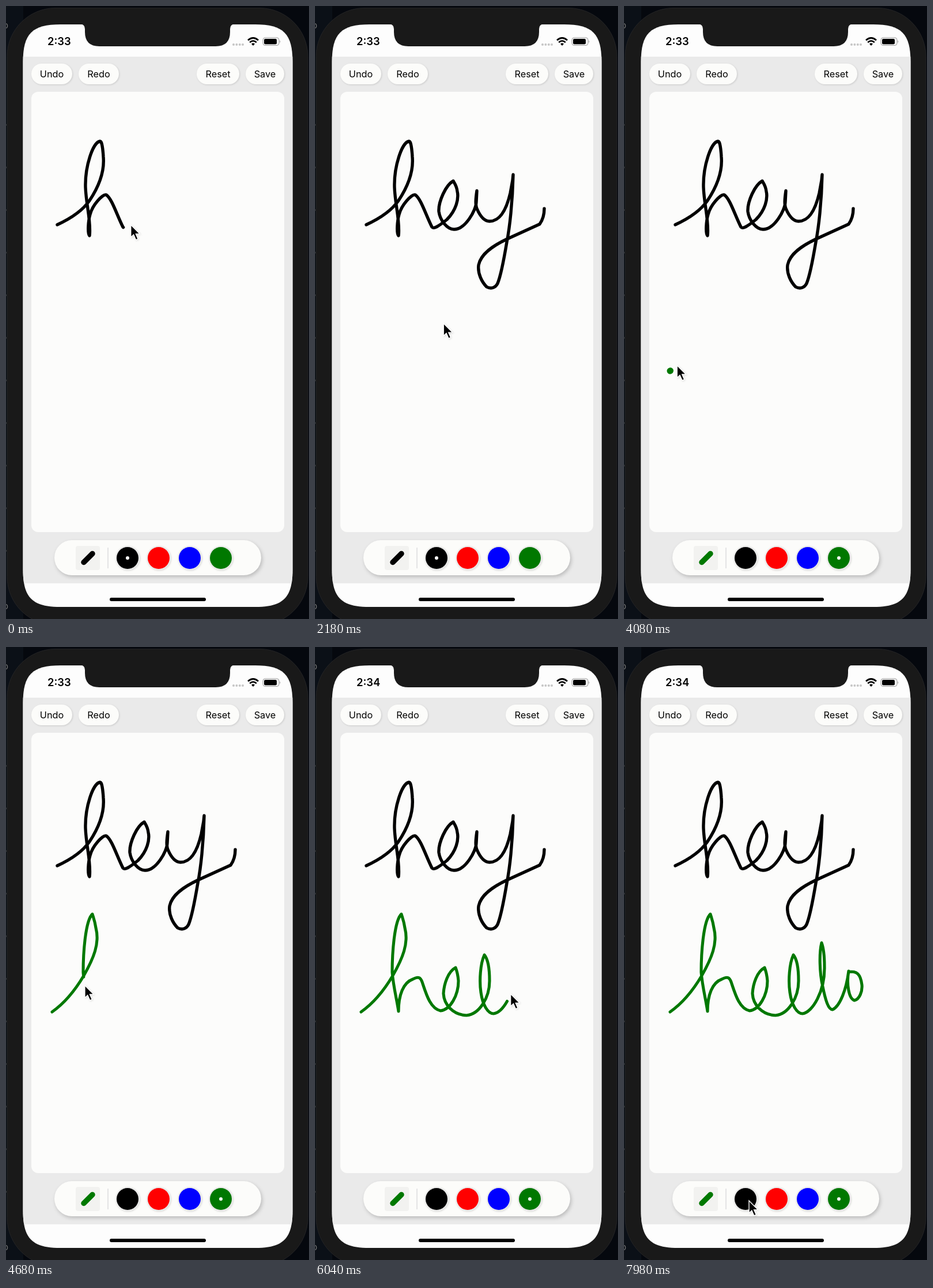
These frames come from a looping animation (526x1065 px, 8000 ms). An HTML page:

```html
<!DOCTYPE html>
<html lang="en">
<head>
<meta charset="utf-8">
<title>Drawing pad</title>
<style>
  html, body { margin: 0; width: 100%; height: 100%; overflow: hidden; background: #05080e; }
  svg { display: block; width: 526px; height: 1065px; font-family: Inter, Roboto, sans-serif; }
  .soft { filter: drop-shadow(1px 1px 1.5px #0002); }
  .bar { filter: drop-shadow(2px 3px 3px #0003); }
  .ink { fill: none; stroke-linecap: round; stroke-linejoin: round; }
</style>
</head>
<body>
<svg viewBox="0 0 526 1065">
  <rect width="30" height="1065" fill="#0b1017"/>
  <g fill="#777" font-size="15"><text x="-5" y="39">o</text><text x="-5" y="1048">o</text></g>
  <path d="M.5 205V980" stroke="#3a3d40" stroke-dasharray="3 71"/>

  <rect x="2" y="3.5" width="522" height="1072" rx="84" fill="#191919" stroke="#242426"/>
  <!-- Continuous corners -->
  <clipPath id="screen"><path d="M29.5 97C29.5 48 45.5 32 94.5 32H432.5C481.5 32 497.5 48 497.5 97
    V979C497.5 1028 481.5 1044 432.5 1044H94.5C45.5 1044 29.5 1028 29.5 979Z"/></clipPath>
  <g clip-path="url(#screen)">
    <rect x="29" y="32" width="469" height="1012" fill="#fdfdfd"/>
    <rect x="29" y="88" width="469" height="915" fill="#eaeaea"/>
  </g>
  <path d="M129 31Q137 32 137 40V45Q137 70 162 70H364Q389 70 389 45V40Q389 32 397 31Z" fill="#191919"/>

  <text id="clock" x="72" y="68" font-size="18.4" font-weight="600"></text>
  <g fill="#c6c6c6"><circle cx="395" cy="67" r="2"/><circle cx="400.4" cy="67" r="2"/><circle cx="405.8" cy="67" r="2"/><circle cx="411" cy="67" r="2"/></g>
  <g fill="none" stroke="#000" stroke-width="2.8">
    <path d="M420 59.5Q429 51.5 438 59.5M423.2 63.2Q429 58 434.8 63.2"/>
    <path d="M426 65.8Q429 63.4 432 65.8L429 69Z" fill="#000" stroke="none"/>
  </g>
  <rect x="446" y="55" width="28" height="13.5" rx="4" fill="none" stroke="#999"/>
  <rect x="448" y="57" width="22" height="9.5" rx="2.2"/>
  <path d="M475.3 59.5v4.5q2-2.2 0-4.5" fill="#999"/>

  <g id="buttons"></g>
  <rect x="44" y="149" width="439" height="765" rx="12" fill="#fcfcfb"/>

  <rect class="bar" x="84" y="928" width="359" height="61" rx="30.5" fill="#fcfcfa"/>
  <rect x="121" y="938" width="42" height="42" rx="4" fill="#f2f2f0"/>
  <path id="pen" d="M135 966.5L150 951.5" stroke-width="9.5" stroke-linecap="round"/>
  <path d="M177 941V977" stroke="#e4e4e4" stroke-width="2"/>
  <g id="swatches"></g>
  <circle id="picked" cy="959" r="3" fill="#fff"/>
  <rect x="180" y="1028" width="167" height="6" rx="3"/>

  <g id="strokes"></g>
  <path id="cursor" class="soft" d="M0 0V21.5L4.8 17L8.8 26L12.4 24.4L8.6 15.6H15.4Z" stroke="#fff" stroke-width="1.4"/>
</svg>
<script>
const LOOP = 8000, LEAD = 15, GREEN = '#007800';
const PICK = 3080, MINUTE = 6000;
const $ = id => document.getElementById(id);

function add(parent, tag, attrs, text = '') {
  const el = document.createElementNS('http://www.w3.org/2000/svg', tag);
  for (const k in attrs) el.setAttribute(k, attrs[k]);
  el.textContent = text;
  return parent.appendChild(el);
}

// Linear interpolation through [time, value...] rows.
function track(rows, t) {
  const i = rows.findIndex(r => r[0] > t);
  if (i < 0) return rows[rows.length - 1].slice(1);
  if (i === 0) return rows[0].slice(1);
  const a = rows[i - 1], b = rows[i], u = (t - a[0]) / (b[0] - a[0]);
  return a.slice(1).map((v, k) => v + (b[k + 1] - v) * u);
}

// Each part is [time its end is reached, path data].
function makeStroke(color, width, parts) {
  const el = add($('strokes'), 'path', { class: 'ink', stroke: color });
  let d = '';
  const keys = parts.map(([time, data]) => {
    el.setAttribute('d', d += data);
    return [time, el.getTotalLength()];
  });
  return { el, width, keys, start: keys[0][0], end: keys[keys.length - 1][0] };
}

function drawStroke(s, t) {
  const len = track(s.keys, t)[0];
  s.el.style.display = t < s.start ? 'none' : '';
  s.el.setAttribute('stroke-dasharray', `${Math.max(len, .01)} 9999`);
  s.el.setAttribute('stroke-width', len < 2 ? 11 : s.width);
}

for (const [x, w, label] of [[44, 71, 'Undo'], [126, 70, 'Redo'], [331, 74, 'Reset'], [416, 67, 'Save']]) {
  add($('buttons'), 'rect', { class: 'soft', x, y: 100, width: w, height: 36, rx: 18, fill: '#fcfcfa' });
  add($('buttons'), 'text', { x: x + w / 2, y: 124, 'font-size': 16.3, 'text-anchor': 'middle' }, label);
}
['#000', '#f00', '#00f', GREEN].forEach((fill, i) => {
  const cx = 211 + 54 * i;
  add($('swatches'), 'circle', { class: 'soft', cx, cy: 959, r: 21, fill: '#e9e9e8' });
  add($('swatches'), 'circle', { cx, cy: 959, r: 19, fill });
});

const strokes = [
  makeStroke('#000', 5.4, [
    [0, `M89 380C115 368 134 354 145 338C163 311 171 285 169 262C168 245 166 234 163 235
      C151 237 137 278 138 315C139 345 148 375 145 399C141 395 143 372 146 362
      C150 346 168 326 174 328C184 335 192 362 203 384`],
    [1040, `C206 388 214 383 229 371C245 355 250 335 247 322C246 313 243 309 240 304
      C227 311 214 340 215 357C217 373 230 388 241 388C260 389 280 355 280 340L281 321
      C279 335 278 345 281 352C287 366 295 374 303 374C320 374 332 355 339 325L343 303`],
    [1120, 'L344 293'],
    [1860, `C343 340 338 385 333 410C328 440 322 470 317 482C313 490 305 492 298 488
      C290 480 282 465 284 450C288 430 310 416 333 405L390 379C395 372 398 362 398 352`]
  ]),
  makeStroke(GREEN, 5.1, [
    [4080, 'M80 634'],
    [5260, `C104 617 122 593 135 571C152 541 163 515 156 488C154 475 151 468 150 464
      C138 475 134 530 134 565C136 590 142 612 145 633C145 605 153 583 170 577
      C180 572 183 574 186 582C193 603 200 628 218 632C235 630 249 605 249 580
      C248 568 246 562 244 557`],
    [6880, `C231 564 224 585 223 602C224 622 240 639 263 640C285 638 303 610 303 580
      C303 560 300 542 294 535C287 550 285 580 288 600C291 622 300 637 310 637
      C327 635 349 598 348 555C348 535 346 522 343 514C339 530 339 565 345 590
      C350 615 355 630 362 630C375 624 386 595 390 563C386 585 390 611 400 614
      C409 612 414 598 413 587C412 579 410 572 406 568`],
    [7020, 'C402 564 397 564 390 564']
  ])
];

const hover = [
  [1860, 398, 352], [2180, 223, 551], [2950, 373, 959], [3200, 373, 959],
  [3950, 80, 634], [4060, 80, 634], [4080, 88, 625],
  [7020, 390, 564], [7150, 392, 570], [7850, 215, 955], [7980, 217, 962]
];

function cursorAt(t) {
  const s = strokes.find(s => t > s.start && t < s.end || t === 0 && s.start === 0);
  if (!s) return track(hover, t);
  const p = s.el.getPointAtLength(track(s.keys, t)[0] + LEAD);
  return [p.x, p.y];
}

function frame(now) {
  const t = now % LOOP, green = t >= PICK;
  strokes.forEach(s => drawStroke(s, t));
  $('cursor').setAttribute('transform', `translate(${cursorAt(t)})`);
  $('pen').setAttribute('stroke', green ? GREEN : '#000');
  $('picked').setAttribute('cx', green ? 373 : 211);
  $('clock').textContent = t < MINUTE ? '2:33' : '2:34';
  requestAnimationFrame(frame);
}
frame(0);
</script>
</body>
</html>
```
